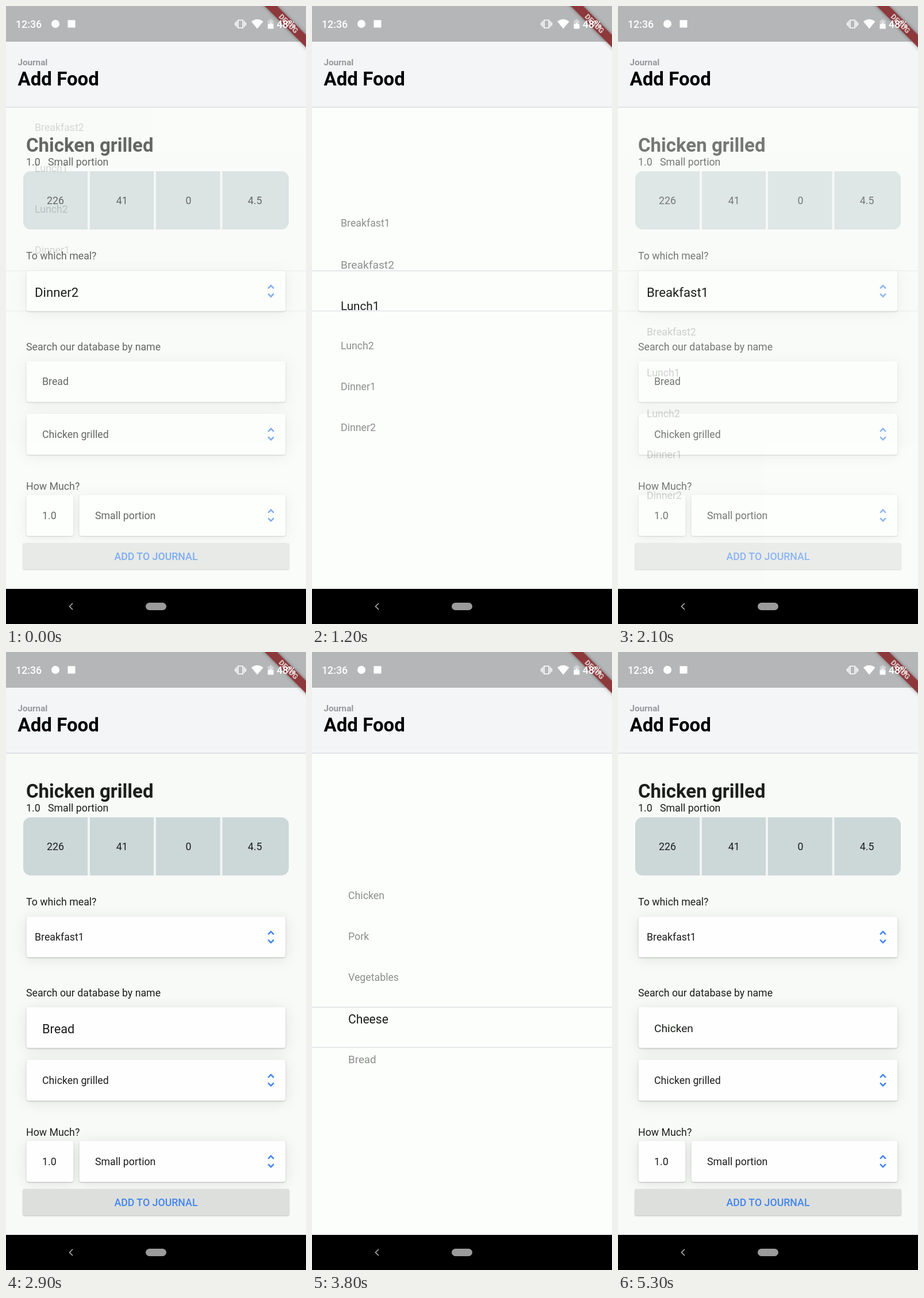
An HTML page that plays this animation: 522 by 1073 pixels, repeating every 5400 ms.

```html
<!DOCTYPE html>
<html lang="en">
<head>
<meta charset="utf-8">
<title>Add Food</title>
<style>
  html, body { margin: 0; width: 100%; height: 100%; overflow: hidden; background: #fcfefc; }
  svg { display: block; font: 17.76px Roboto, sans-serif; fill: #1c1e1c; }
  .cards { fill: #fdfefd; filter: drop-shadow(0 1px 1px rgba(0,0,0,.24)) drop-shadow(0 3px 11px rgba(0,0,0,.09)); }
  .button { fill: #dddfdd; filter: drop-shadow(0 1.5px 1px rgba(0,0,0,.26)); }
  .arrows { fill: #4386ee; }
  .mid { text-anchor: middle; }
  .bold { font-weight: 700; }
  .medium { font-weight: 500; }
</style>
</head>
<body>
<svg width="522" height="1073" viewBox="0 0 522 1073">
  <defs>
    <path id="unfold" transform="scale(1.269) translate(-12 -12)" d="M12 5.83 15.17 9l1.41-1.41L12 3 7.41 7.59 8.83 9zM12 18.17 8.83 15l-1.41 1.41L12 21l4.59-4.59L15.17 15z"/>
    <clipPath id="grid"><rect x="30" y="287" width="462" height="101" rx="13"/></clipPath>
    <clipPath id="page"><path d="M0 176H522V1012H0z"/></clipPath>
  </defs>

  <g id="form">
    <path fill="#f8faf8" d="M0 176H522V1012H0z"/>
    <g clip-path="url(#grid)">
      <path fill="#f1f5f3" d="M30 287H492V388H30z"/>
      <path fill="#ccd7d8" d="M30 287h112v101h-112zM146 287h111v101h-111zM261 287h111.500v101h-111.500zM376.500 287h116v101h-116z"/>
    </g>
    <g class="cards">
      <rect x="35.500" y="459.500" width="451" height="70.500" rx="4"/>
      <rect x="35.500" y="616.500" width="451" height="71" rx="4"/>
      <rect x="35.500" y="708" width="451" height="71" rx="4"/>
      <rect x="35.500" y="849" width="82" height="71" rx="4"/>
      <rect x="127.500" y="849" width="359" height="71" rx="4"/>
    </g>
    <rect class="button" x="29.500" y="932.500" width="463" height="45.500" rx="2"/>
    <g class="arrows">
      <use href="#unfold" x="0" y="0" transform="translate(461 495)"/>
      <use href="#unfold" transform="translate(461 743.500)"/>
      <use href="#unfold" transform="translate(461 884.500)"/>
    </g>
  </g>
  <g clip-path="url(#page)"><g id="overlay"></g></g>

  <g id="chrome">
    <path fill="#f4f5f7" d="M0 62H522V175H0z"/>
    <path fill="#d4d6da" d="M0 175H522V176.300H0z"/>
    <path fill="#b5b6b7" d="M0 0H522V62H0z"/>
    <path d="M0 1012H522V1073H0z" fill="#000"/>
    <path d="M116 1037l-5.500 5.500 5.500 5.500" fill="none" stroke="#aaa" stroke-width="1.700"/>
    <rect x="243" y="1036" width="36" height="13" rx="6.500" fill="#9b9b9b"/>
    <g transform="translate(522 0) rotate(45)">
      <path d="M-60 35.500H60V50.800H-60z" fill="#8d383b" style="filter: drop-shadow(0 0 3px rgba(0,0,0,.4))"/>
      <text class="mid" y="47.700" font-size="12.900" font-weight="900" fill="#d9c3c4">DEBUG</text>
    </g>
    <g fill="#fff">
      <circle cx="86" cy="31" r="7"/>
      <rect x="107.500" y="24.500" width="13" height="13"/>
      <path d="M427 27q10-8 20.500 0L437.200 39.500z"/>
      <path d="M403.800 24.500h8.400v13.500h-8.400zM401.300 26v10.500M414.700 26v10.500M398.800 28.500v5.500M417.200 28.500v5.500" fill="none" stroke="#fff" stroke-width="1.700"/>
      <path d="M455.500 25h3v-2h4v2h3v7h-10z" opacity=".4"/>
      <path d="M455.500 31.500h3.500l2.500-5v5h4V39.500h-10z"/>
    </g>
  </g>
</svg>
<script>
const LOOP = 5400, ROW = 71, GROW = 0.25;
const $ = id => document.getElementById(id);
const START = performance.now();

function add(parent, tag, attrs, content = '') {
  const el = document.createElementNS('http://www.w3.org/2000/svg', tag);
  for (const name in attrs) el.setAttribute(name, attrs[name]);
  el.textContent = content;
  parent.append(el);
  return el;
}

// y is the middle of the capitals
function label(parent, x, y, content, attrs = {}) {
  const size = attrs['font-size'] || 17.76;
  return add(parent, 'text', { x, y: y + size * 0.355, ...attrs }, content);
}

const form = $('form'), chrome = $('chrome'), overlay = $('overlay');
label(form, 35, 241, 'Chicken grilled', { class: 'bold', 'font-size': 33 });
label(form, 35, 271, '1.0');
label(form, 73, 271, 'Small portion');
['226', '41', '0', '4.5'].forEach((value, i) =>
  label(form, 86 + i * 115.7, 338, value, { class: 'mid' }));
label(form, 35, 434, 'To which meal?');
label(form, 35, 591.5, 'Search our database by name');
label(form, 63, 744, 'Chicken grilled');
label(form, 35, 834, 'How Much?');
label(form, 63, 885, '1.0');
label(form, 155, 885, 'Small portion');
label(form, 261, 956, 'ADD TO JOURNAL', { class: 'mid medium', fill: '#4386ee' });
label(chrome, 20.5, 97.5, 'Journal', { class: 'bold', 'font-size': 15.2, fill: '#97989b' });
label(chrome, 20.5, 126, 'Add Food', { class: 'bold', 'font-size': 33, fill: '#000' });
label(chrome, 17, 31.5, '12:36', { class: 'medium', fill: '#fff' });
label(chrome, 471, 31.5, '48%', { class: 'medium', fill: '#fff' });
add(overlay, 'path', { d: 'M0 176H522V1012H0z', fill: '#fcfefc' });

// Scales from the top left corner of the line of text
function place(el, x, y, scale) {
  el.setAttribute('transform', `translate(${x} ${y - 10.4}) scale(${scale})`);
}

function picker(x, y, names) {
  const group = add(overlay, 'g', {});
  add(group, 'path', { d: `M0 ${y - 35.2}H522M0 ${y + 34.6}H522`, stroke: '#dfe1e5', 'stroke-width': 1.5 });
  const items = names.map(name => label(group, 0, 10.4, name));
  const field = label(form, 0, 10.4, '');
  return (visible, scroll, selected, scale) => {
    group.style.display = visible ? '' : 'none';
    items.forEach((item, i) => {
      const offset = i * ROW - scroll, distance = Math.abs(offset);
      place(item, x, y + offset, 1 + GROW * Math.max(0, 1 - distance / ROW));
      item.setAttribute('fill', distance < ROW / 2 ? '#1c1e1c' : '#8c8d8c');
    });
    field.textContent = names[selected];
    place(field, x, y, scale);
  };
}

const meals = picker(50, 495, ['Breakfast1', 'Breakfast2', 'Lunch1', 'Lunch2', 'Dinner1', 'Dinner2']);
const foods = picker(63, 652, ['Chicken', 'Pork', 'Vegetables', 'Cheese', 'Bread']);

// Linear track through [time, value] points
function track(t, points) {
  const next = points.findIndex(p => p[0] > t);
  if (next === 0) return points[0][1];
  if (next < 0) return points[points.length - 1][1];
  const [t0, a] = points[next - 1], [t1, b] = points[next];
  return a + (b - a) * (t - t0) / (t1 - t0);
}

const FADE = [[0, .33], [50, 0], [620, 0], [820, 1], [1980, 1], [2180, 0],
  [2920, 0], [3120, 1], [4964, 1], [5164, 0]];
const MEAL_SCROLL = [[850, 355], [1200, 118.5], [1400, 45], [1600, 9], [1700, 0]];
const FOOD_SCROLL = [[3500, 284], [3800, 230], [4100, 155], [4500, 37], [4600, 13], [4700, 0]];
const MEAL_SCALE = [[50, 1.25], [200, 1], [420, 1], [620, 1.25], [2180, 1.25], [2380, 1]];
const FOOD_SCALE = [[2720, 1], [2920, 1.25], [5164, 1.25], [5364, 1]];

function draw() {
  const t = (performance.now() - START) % LOOP;
  overlay.setAttribute('opacity', track(t, FADE));
  meals(t < 2600, track(t, MEAL_SCROLL), t < 1300 ? 5 : 0, track(t, MEAL_SCALE));
  foods(t >= 2600, track(t, FOOD_SCROLL), t < 4000 ? 4 : 0, track(t, FOOD_SCALE));
  requestAnimationFrame(draw);
}
draw();
</script>
</body>
</html>
```
